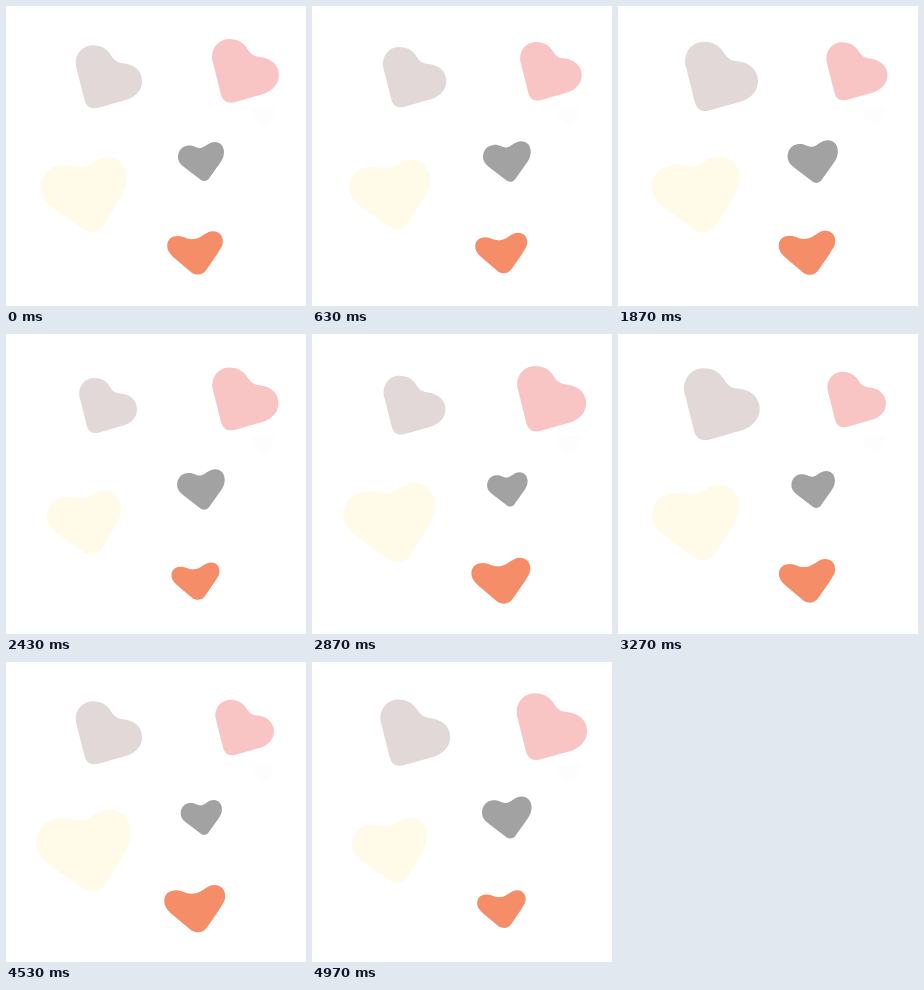
These frames come from a looping animation (300 by 300 pixels, 5010 ms). An HTML page:

```html
<!DOCTYPE html>
<html lang="en">
<head>
<meta charset="utf-8">
<title>Beating hearts</title>
<style>
  html, body { margin: 0; width: 100%; height: 100%; overflow: hidden; background: #fff; }
  svg { display: block; width: 100vw; height: 100vh; }
</style>
</head>
<body>
<svg id="stage" viewBox="0 0 300 300"></svg>
<script>
const LOOP = 5010;

// Outlines with the pivot around which they grow and shrink.
const LEANING = {
  pivot: [233, 70],
  d: 'M207 57C203 44 212 33 223 33C232 33 238 37 241.5 43C244.5 48 248 50.5 254 51' +
     'C265 52 273 59 273 69C273 78 267 84 259 87.5L229 96C221 98 217 95 215 89Z'
};
const BROAD = {
  pivot: [80, 187],
  d: 'M56 159C65 158 71 162 79 160C87 158 90 151 102 151C113 151 121 160 121 172' +
     'C121 182 117 187 114 193L98 219C94 226 85 228 78 224L47 202' +
     'C39 196 34 190 34 181C34 169 44 159 56 159Z'
};
const SMALL = {
  pivot: [198, 155],
  d: 'M182 139.5C188 139 190 142 194 142C199 142 202 136 209 136C214 136 218 140 218 146' +
     'C218 151 216 154 214 157L204 171C202 175 198 176 195 174L178 161' +
     'C174 158 172 155 172 151C172 145 176 140 182 139.5Z'
};
const FLAT = {
  pivot: [192, 249],
  d: 'M172 230C178 230 181 234 188 233C196 232 200 225 207 225C213 225 217 229 217 235' +
     'C217 240 215 242 212 247L201 263C197 269 192 270 186 267L167 251' +
     'C163 247 161 244 161 240C161 233 166 230 172 230Z'
};

// size: scale at full beat; depth: share lost at rest; period and peak in ms.
const hearts = [
  { shape: BROAD,   at: [257, 109.5], size: 0.32, depth: 0.25, fill: '#fdfdfd', period: 1222, peak: 240 },
  { shape: LEANING, at: [96.5, 76],  size: 1.142, depth: 0.25, fill: '#e3d8d8', period: 1510, peak: 270 },
  { shape: LEANING, at: [233, 70],   size: 1.165, depth: 0.25, fill: '#f9c4c4', period: 1222, peak: 240 },
  { shape: BROAD,   at: [80, 187],   size: 1.165, depth: 0.27, fill: '#fffbe8', period: 1389, peak: 255 },
  { shape: SMALL,   at: [198, 155],  size: 1.157, depth: 0.25, fill: '#a3a2a2', period: 601,  peak: 110 },
  { shape: FLAT,    at: [192, 249],  size: 1.165, depth: 0.27, fill: '#f48d68', period: 1389, peak: 255 }
];

const stage = document.getElementById('stage');
for (const heart of hearts) {
  heart.node = document.createElementNS('http://www.w3.org/2000/svg', 'path');
  heart.node.setAttribute('d', heart.shape.d);
  heart.node.setAttribute('fill', heart.fill);
  stage.append(heart.node);
}

// Sharp peak, rounded trough.
const beat = (t, { depth, period, peak }) =>
  1 - depth * Math.abs(Math.sin(Math.PI * (t - peak) / period));

function draw(t) {
  for (const heart of hearts) {
    const [x, y] = heart.at;
    const [px, py] = heart.shape.pivot;
    const scale = heart.size * beat(t, heart);
    heart.node.setAttribute('transform',
      `translate(${x} ${y}) scale(${scale}) translate(${-px} ${-py})`);
  }
}

const start = performance.now();
function tick() {
  draw((performance.now() - start) % LOOP);
  requestAnimationFrame(tick);
}
tick();
</script>
</body>
</html>
```
